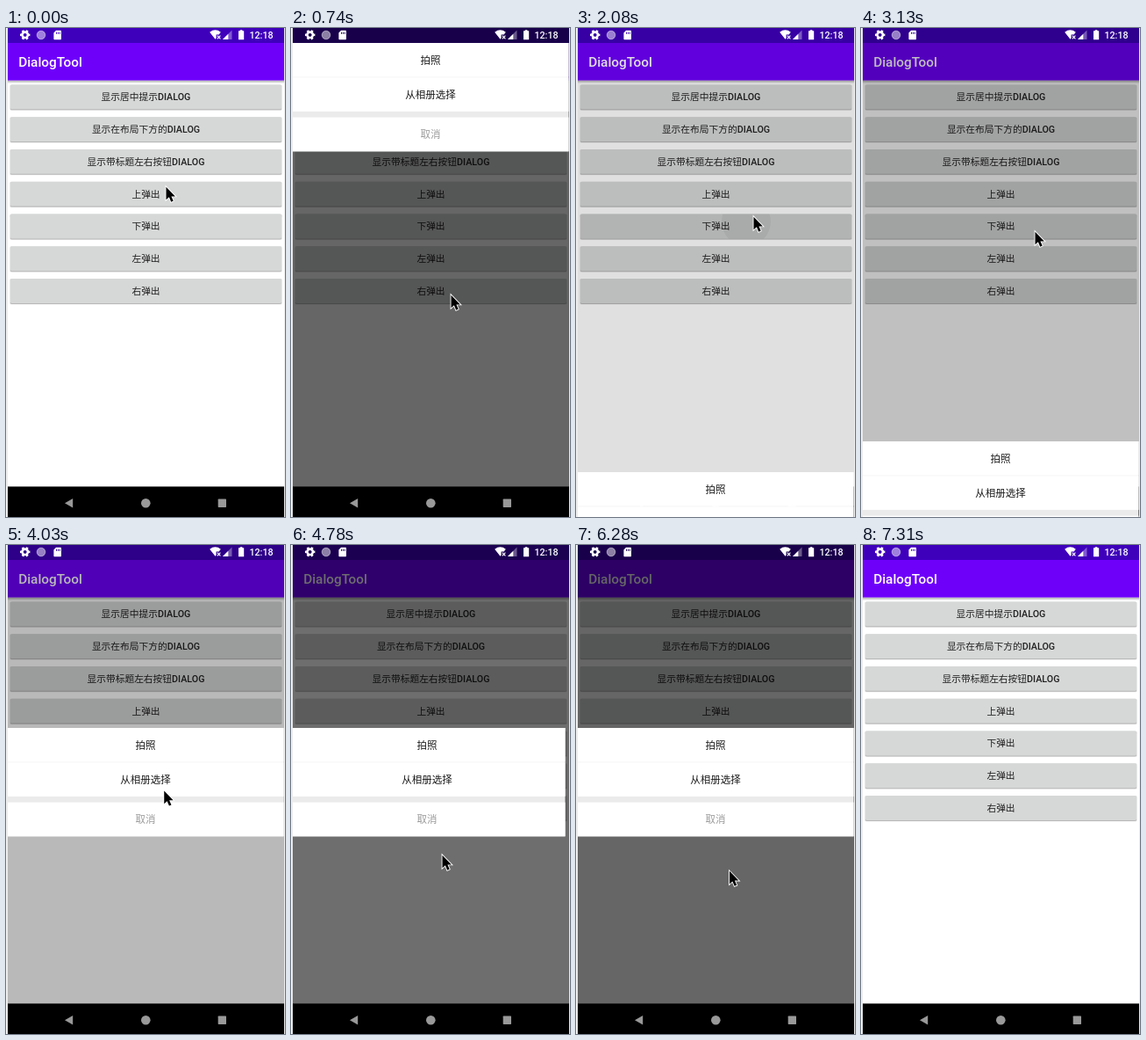
An HTML page for the animation above (7620 ms loop, 318 by 556 pixels).

```html
<!DOCTYPE html>
<html lang="zh">
<head>
<meta charset="utf-8">
<title>DialogTool</title>
<style>
  html, body { margin: 0; width: 100%; height: 100%; overflow: hidden; background: #ececec; }
  svg { display: block; width: 318px; height: 556px; }
  text { font-family: Roboto, "Noto Sans CJK SC", "Noto Sans CJK", sans-serif; }
  .mid { text-anchor: middle; }
  .btn { font-size: 10.73px; fill: #212121; }
  .row { font-size: 11.5px; }
  .med { font-weight: 500; }
</style>
</head>
<body>
<svg viewBox="0 0 318 556">
  <defs>
    <clipPath id="screen"><rect x="2" width="315" height="556"/></clipPath>
    <clipPath id="press"><rect id="pressBox" x="5" width="309" height="27.8" rx="1.5"/></clipPath>
    <linearGradient id="shade" x2="0" y2="1">
      <stop offset="0" stop-opacity=".33"/><stop offset="1" stop-opacity="0"/>
    </linearGradient>
  </defs>
  <g clip-path="url(#screen)">
    <rect x="2" width="315" height="522" fill="#fff"/>
    <rect x="2" y="59.6" width="315" height="3.6" fill="url(#shade)"/>
    <rect x="2" y="17" width="315" height="42.6" fill="#6e00fa"/>
    <rect x="2" width="315" height="17" fill="#3f00bc"/>
    <text class="med" x="14.2" y="44.3" font-size="15.33" fill="#fff">DialogTool</text>
    <g id="buttons"></g>
    <g id="ripple" clip-path="url(#press)">
      <rect x="2" y="60" width="315" height="260" fill-opacity=".05"/>
      <circle id="wave" fill-opacity=".055"/>
    </g>
    <rect id="dim" x="2" width="315" height="522"/>
    <rect x="2" y="521.4" width="315" height="35"/>
    <g id="dialog"></g>
    <g fill="#fff">
      <g fill="none" stroke="#fff" transform="translate(21.7 7.8)">
        <circle r="3.2" stroke-width="2.6"/>
        <circle r="4.8" stroke-width="1.9" pathLength="12" stroke-dasharray="1" stroke-dashoffset=".5"/>
      </g>
      <circle cx="40" cy="8" r="4.8" fill-opacity=".5" stroke="#fff" stroke-opacity=".45"/>
      <path fill-rule="evenodd" d="M57 2.8H62.2Q63 2.8 63 3.6V12.4Q63 13.2 62.2 13.2H55.2Q54.4 13.2 54.4 12.4V5.4ZM57 4.7V6.7H58V4.7ZM58.9 4.7V6.7H59.9V4.7ZM60.8 4.7V6.7H61.8V4.7Z"/>
      <path d="M232.2 4.7Q238.5 0 244.8 4.7L242.7 7.4H239.6V11.4L238.5 12.8Z"/>
      <path d="M240.8 8.6L244.4 12.4M244.4 8.6L240.8 12.4" stroke="#fff" stroke-width="1.1"/>
      <path d="M247 13L257.5 2.6V13Z" fill-opacity=".35"/>
      <path d="M247 13L253.3 6.8V13Z"/>
      <path d="M266.8 2.2H269.4V3.3H271.2V13.2H265V3.3H266.8Z"/>
      <text class="med" x="277.4" y="12" font-size="10.73">12:18</text>
      <g fill-opacity=".6">
        <path d="M67 540.2L76.2 535V545.4Z"/>
        <circle cx="159.3" cy="540.2" r="5.3"/>
        <rect x="241.7" y="535.6" width="9.3" height="9.3" rx=".6"/>
      </g>
    </g>
    <path id="cursor" d="M0 0V14.6L3.4 11.6L5.7 17L8.2 15.9L5.9 10.7H10.4Z" stroke="#fff" stroke-width="1.8" paint-order="stroke"/>
  </g>
</svg>
<script>
const $ = id => document.getElementById(id);
const set = (el, attrs) => { for (const a in attrs) el.setAttribute(a, attrs[a]); };
const clamp = u => Math.max(0, Math.min(1, u));
const smooth = u => u * u * (3 - 2 * u);

const LOOP = 7620, STEP = 150, LAST = 49;
const SHORT = [4, 12, 44, 47];   // steps that last 10 ms less
const DIM = .6, FADE_IN = 370, FADE_OUT = 220;
const buttonTop = i => 64.5 + 36.77 * i;

const labels = ['显示居中提示|DIALOG', '显示在布局下方的|DIALOG', '显示带标题左右按钮|DIALOG',
  '上弹出', '下弹出', '左弹出', '右弹出'];
$('buttons').innerHTML = labels.map((label, i) => {
  const y = buttonTop(i), [zh, en = ''] = label.split('|');
  const box = (grow, dy, fill) =>
    `<rect x="${5 - grow}" y="${y - grow + dy}" width="${309 + 2 * grow}" height="${27.8 + 2 * grow}" rx="1.6" ${fill}/>`;
  return box(.7, .7, 'fill-opacity=".12"') + box(0, 1, 'fill-opacity=".18"') + box(0, 0, 'fill="#d6d7d7"') +
    `<text class="btn mid" x="159.5" y="${y + 17.9}">${zh}<tspan class="med">${en}</tspan></text>`;
}).join('');

const row = (y, label, fill) =>
  `<rect y="${y}" width="314.5" height="38.7" fill="#fff"/>` +
  `<text class="row mid" x="157" y="${y + 23.6}" fill="${fill}">${label}</text>`;
$('dialog').innerHTML = '<rect width="314.5" height="123.3" fill="#ebebeb"/>' +
  row(0, '拍照', '#1c1c1c') + row(39.2, '从相册选择', '#1c1c1c') + row(84.6, '取消', '#9a9a9a');

// Rest height, slide-out offset, opening button, where it is pressed, times
const dialogs = [
  { y: 17, dx: 0, dy: -140, button: 3, px: 183, py: 184, open: 280, close: 850 },
  { y: 399, dx: 0, dy: 157, button: 4, px: 194, py: 220, open: 2006, close: 3000 },
  { y: 208, dx: -315, dy: 0, button: 5, px: 182, py: 266, open: 3860, close: 4768 },
  { y: 208, dx: 315, dy: 0, button: 6, px: 175, py: 309, open: 5636, close: 6500 }
];

// Pointer stops: time, x, y
const stops = [
  [150, 183, 181], [740, 183, 304], [2080, 203, 215], [2530, 199, 232], [3130, 199, 232],
  [3800, 182, 268], [4780, 173, 353], [5680, 179, 309], [6450, 175, 380], [7300, 190, 575]
];

function pointer(t) {
  const i = Math.max(1, stops.findIndex(s => s[0] >= t));
  const [a, b] = t > stops[stops.length - 1][0] ? stops.slice(-2) : [stops[i - 1], stops[i]];
  const u = smooth(clamp((t - a[0]) / (b[0] - a[0])));
  return [a[1] + (b[1] - a[1]) * u, a[2] + (b[2] - a[2]) * u];
}

const stepStart = k => STEP * k - 10 * SHORT.filter(s => s < k).length;

function capture(t) {
  let k = Math.min(LAST, Math.floor(t / STEP));
  while (k < LAST && stepStart(k + 1) <= t) k++;
  return stepStart(k);
}

function draw(time) {
  const t = capture(time);
  const d = dialogs.filter(d => t >= d.open - 120).pop() || dialogs[0];

  const enter = clamp((t - d.open) / FADE_IN), exit = clamp((t - d.close) / FADE_OUT);
  const hidden = exit ? exit ** 1.5 : 1 - clamp(3.25 * (enter - .1));
  set($('dim'), { 'fill-opacity': DIM * enter * (1 - exit) });
  set($('dialog'), {
    transform: `translate(${Math.round(2 + d.dx * hidden)} ${Math.round(d.y + d.dy * hidden)})`,
    visibility: hidden < 1 ? 'visible' : 'hidden'
  });

  const age = t - d.open + 120;
  set($('ripple'), { opacity: age < 0 ? 0 : 1 - clamp((age - 250) / 150) });
  set($('pressBox'), { y: buttonTop(d.button) });
  set($('wave'), { cx: d.px, cy: d.py, r: 28 * clamp(age / 160) });

  const [x, y] = pointer(t);
  set($('cursor'), { transform: `translate(${x - .5} ${y - .3})` });
}

const start = performance.now();
function tick() {
  draw((performance.now() - start) % LOOP);
  requestAnimationFrame(tick);
}
tick();
</script>
</body>
</html>
```
